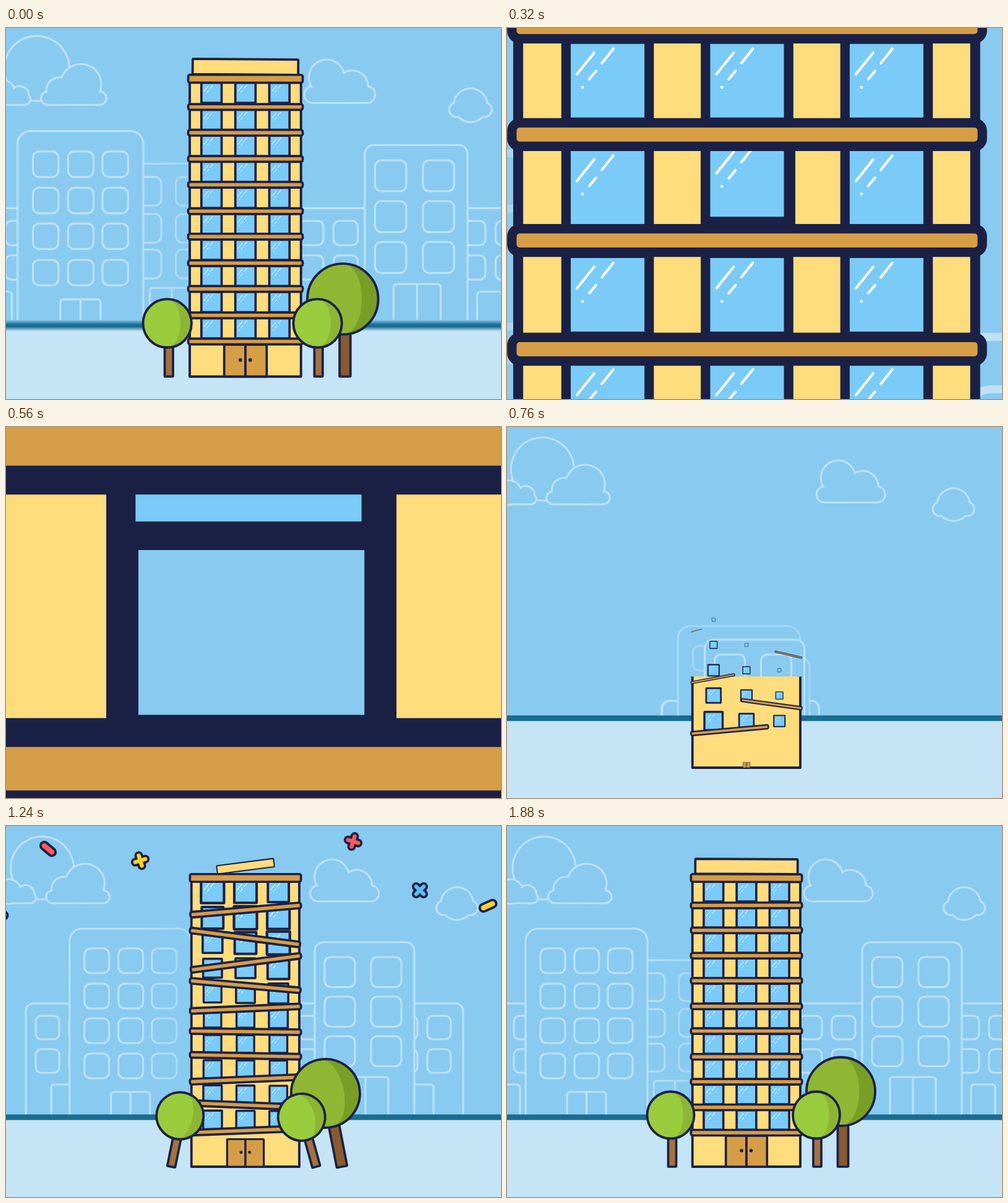
Write an HTML page with a canvas that moves like this. It is 800 by 600 pixels and loops after 1.92 s.

```html
<!DOCTYPE html>
<html lang="en">
<head>
<meta charset="utf-8">
<title>Tower loop</title>
<style>
html, body { margin: 0; width: 100%; height: 100%; overflow: hidden; background: #89caf0; }
canvas { display: block; width: 800px; height: 600px; }
</style>
</head>
<body>
<canvas id="stage" width="800" height="600"></canvas>
<script>
const ctx = document.getElementById('stage').getContext('2d');
const LOOP = 1920, STEP = 40, THROUGH = 720;
const SKY = '#89caf0', GROUND = '#c5e4f6', HORIZON = '#186d91', LINE = '#bde2f8';
const NAVY = '#1b2145', WALL = '#ffdc7c', WOOD = '#d69d47', GLASS = '#7acbf7';
const RED = '#fb5a5f', YELLOW = '#fdd22f', BLUE = '#5cbcf0';

// Tower geometry
const MID = 387, LEFT = 299.7, RIGHT = 474, FLOOR = 551;
const BARS = [84, 128.3, 168.7, 209.8, 250.2, 291.7, 331.6, 373.2, 413.6, 455, 496];
const COLS = [333.8, 387, 440.2];
const OPEN_ROW = 3, ROW_Y = 230;

// Smooth monotone curve through time, value pairs
function key(t, a) {
  const n = a.length / 2;
  if (t <= a[0]) return a[1];
  if (t >= a[2 * n - 2]) return a[2 * n - 1];
  const sec = i => (a[2 * i + 3] - a[2 * i + 1]) / (a[2 * i + 2] - a[2 * i]);
  const slope = i => {
    if (i === 0) return sec(0);
    if (i === n - 1) return sec(n - 2);
    const p = sec(i - 1), q = sec(i);
    return p * q > 0 ? 2 * p * q / (p + q) : 0;
  };
  let i = 0;
  while (t > a[2 * i + 2]) i++;
  const h = a[2 * i + 2] - a[2 * i], u = (t - a[2 * i]) / h, w = 1 - u;
  return a[2 * i + 1] * w * w * (1 + 2 * u) + a[2 * i + 3] * u * u * (3 - 2 * u)
    + h * u * w * (slope(i) * w - slope(i + 1) * u);
}

const swing = u => key(u, [-7, -18, -5, -13, -4, -10.5, -3, -7.8, -2, -5.2, -1, -2.3, 0, 0, 1, 4.9,
  2, 7.4, 3, 7.4, 4, 5, 5, 2.4, 6, 0.6, 7, -1, 8, -2.4, 9, -2.3, 10, -2.2, 11, -1, 12, -0.5, 14, 0.2, 18, 0]);
const pop = v => key(v, [-3, 0, -2, 0.17, -1, 0.37, 0, 0.57, 1, 0.75, 2, 0.93, 3, 1.07, 4, 1.14,
  5, 1.17, 6, 1.1, 7, 1.01, 8, 0.96, 9, 0.91, 10, 0.89, 11, 0.9, 13, 0.94, 16, 1]);

function at(x, y, deg, s, draw) {
  if (s <= 0.01) return;
  ctx.save();
  ctx.translate(x, y);
  ctx.rotate(deg * Math.PI / 180);
  ctx.scale(s, s);
  draw();
  ctx.restore();
}

function box(x, y, w, h, r, fill, stroke, lw) {
  ctx.beginPath();
  ctx.roundRect(x, y, w, h, r);
  if (fill) { ctx.fillStyle = fill; ctx.fill(); }
  if (stroke) { ctx.strokeStyle = stroke; ctx.lineWidth = lw; ctx.stroke(); }
}

function rect(x, y, w, h, fill) {
  ctx.fillStyle = fill;
  ctx.fillRect(x, y, w, h);
}

function seg(x1, y1, x2, y2, color, lw) {
  ctx.strokeStyle = color;
  ctx.lineWidth = lw;
  ctx.beginPath();
  ctx.moveTo(x1, y1);
  ctx.lineTo(x2, y2);
  ctx.stroke();
}

// Outline around the union of a flat base and some circles
function cloud(dx, base, bumps) {
  for (const [grow, color] of [[1.5, LINE], [-1.5, SKY]]) {
    ctx.fillStyle = color;
    if (base) {
      const [l, r, top, bottom] = base;
      const h = bottom - top + 2 * grow;
      box(l + dx - grow, top - grow, r - l + 2 * grow, h, h / 2, color);
    }
    for (const [x, y, r] of bumps) {
      ctx.beginPath();
      ctx.arc(x + dx, y, r + grow, 0, 7);
      ctx.fill();
    }
  }
}

function clouds(t) {
  const d = Math.min(t, LOOP) - 1880;
  const slow = d * 0.0024;
  cloud(slow, null, [[60, 68, 51]]);
  cloud(slow, [-40, 50, 108, 125], [[6, 106, 20], [33, 110, 14.5]]);
  cloud(slow, [66.5, 169, 104, 125], [[95, 102, 20], [129, 93, 32]]);
  cloud(d * -0.018, [480, 591, 96, 122], [[515, 82, 28], [555, 96, 25]]);
  cloud(d * 0.0155, [705.5, 772.5, 121, 144], [[739, 125.5, 26.5]]);
}

function house(x, top, w, r, color, wins, door) {
  box(x, top, w, 500 - top, [r, r, 0, 0], SKY, color, 3);
  const { xs, ys, cw, ch, cr } = wins;
  for (const wx of xs) for (const wy of ys) box(x + wx, wy, cw, ch, cr, null, color, 3);
  if (!door) return;
  const [dx, dy, dw, split] = door;
  box(x + dx, dy, dw, 500 - dy, [5, 5, 0, 0], null, color, 3);
  if (split) seg(x + dx + dw / 2, dy, x + dx + dw / 2, 500, color, 3);
}

function houses(t) {
  if (t < 640) return;
  const q = key(t, [760, 1.6, 1040, 1, 1240, 0.472, 1560, 0.1, 1880, 0]);
  const rise = key(t, [640, 340, 820, 90, 1000, 0]);
  const fade = ctx.createLinearGradient(215, 0, 300, 0);
  fade.addColorStop(0, LINE);
  fade.addColorStop(1, '#a5d6f4');
  const low = xs => ({ xs, ys: [307, 361], cw: 38, ch: 38, cr: 9 });
  ctx.save();
  ctx.translate(0, rise);
  house(-59 + 193 * q, 287, 130, 12, LINE, low([16, 70]), [41, 418, 39]);
  house(837 - 208 * q - 135, 287, 135, 12, LINE, low([23, 77]), [48, 418, 39]);
  house(185 + 90 * q, 217, 160, 14, fade,
    { xs: [29, 93], ys: [238, 296, 352], cw: 41, ch: 45, cr: 10 }, [52, 412, 69, true]);
  house(430 - 112 * q, 287, 165, 12, LINE, low([41, 95]));
  house(30 + 154 * q, 166, 197, 20, fade,
    { xs: [24, 79, 133], ys: [198, 255, 311, 368], cw: 40, ch: 40, cr: 10 }, [67, 430, 63, true]);
  house(574 - 159 * q, 188, 161, 14, LINE,
    { xs: [16, 91], ys: [212, 276, 340], cw: 49, ch: 48.5, cr: 10 }, [45, 406, 74, true]);
  ctx.restore();
}

function ground(t) {
  rect(-400, 471, 1600, 900, GROUND);
  if (t < LOOP) return rect(-400, 466.5, 1600, 9, HORIZON);
  const soft = ctx.createLinearGradient(0, 462, 0, 480);
  soft.addColorStop(0, SKY);
  soft.addColorStop(0.42, HORIZON);
  soft.addColorStop(0.6, HORIZON);
  soft.addColorStop(1, GROUND);
  rect(-400, 462, 1600, 18, soft);
}

// color, crossed, place and turn at 1040 ms, then at 1240 ms
const BITS = [
  [RED, 0, 173, 125, 108, 68, 37, 40],
  [BLUE, 0, 131, 183, 138, -11, 142, 200],
  [YELLOW, 0, 608, 201, 71, 779, 129, -24],
  [YELLOW, 1, 288, 153, 17, 217, 56, -17],
  [RED, 1, 494, 119, 45, 561, 25, 17],
  [BLUE, 1, 523, 256, 30, 669, 104, 45]
];

function confetti(t) {
  if (t < 860 || t > 1800) return;
  const n = (t - 1040) / 200;
  const gx = (1 - 0.76 ** n) / 0.24, gy = (1 - 0.48 ** n) / 0.52;
  const size = key(t, [860, 0, 960, 1]);
  ctx.lineCap = 'round';
  for (const [color, cross, x1, y1, r1, x2, y2, r2] of BITS) {
    at(x1 + (x2 - x1) * gx, y1 + (y2 - y1) * gy, r1 + (r2 - r1) * gx, size, () => {
      const half = cross ? 8.5 : 8;
      for (const [c, lw] of [[NAVY, cross ? 14 : 16], [color, cross ? 6.5 : 8]]) {
        seg(-half, 0, half, 0, c, lw);
        if (cross) seg(0, -half, 0, half, c, lw);
      }
    });
  }
}

function pane() {
  box(-15.85, -15.85, 31.7, 31.7, 0.6, GLASS, NAVY, 3.6);
  ctx.lineCap = 'round';
  seg(-11.7, -2.5, -5.1, -10.7, '#fff', 0.95);
  seg(-2.2, -6.7, 2.2, -12.2, '#fff', 0.95);
  seg(-7, -0.6, -4.4, -3.7, '#fff', 0.95);
  seg(-9.6, 2.5, -9.55, 2.5, '#fff', 1.1);
}

const lift = t => key(t, [2120, 0, 2240, 2.9, 2360, 10, 2480, 24.6, 2560, 34]);

function openWindow(t) {
  ctx.save();
  ctx.beginPath();
  ctx.rect(369.3, 209.8, 36.1, 40.4);
  ctx.clip();
  rect(369.3, 209.8, 36.1, 40.4, NAVY);
  at(MID, ROW_Y - lift(t), 0, 1, pane);
  ctx.restore();
}

function doors() {
  for (const x of [-33.3, 0]) box(x, -50, 33.3, 50, 1, WOOD, NAVY, 3.6);
  ctx.fillStyle = NAVY;
  for (const x of [-8, 7.5]) {
    ctx.beginPath();
    ctx.arc(x, -26, 2.8, 0, 7);
    ctx.fill();
  }
}

function tower(t) {
  if (t < 600) return;
  const n = (t - 1040) / STEP;
  const top = key(t, [600, 551, 1040, 150, 1120, 84]);
  at(MID, 64.5, key(t, [1160, -14, 1240, -7.3, 1320, 0, 1420, 6, 1560, 2.8, 1700, -0.8, 1880, 0.3, 1960, 0.5]),
    key(t, [1160, 0, 1240, 0.56, 1330, 1]),
    () => box(-82.7, -11, 165.4, 24, 1.5, WALL, NAVY, 3.7));

  rect(LEFT, top, RIGHT - LEFT, FLOOR - top, WALL);
  ctx.lineCap = 'butt';
  ctx.lineJoin = 'round';
  ctx.strokeStyle = NAVY;
  ctx.lineWidth = 3.8;
  ctx.beginPath();
  ctx.moveTo(LEFT, top);
  ctx.lineTo(LEFT, FLOOR);
  ctx.lineTo(RIGHT, FLOOR);
  ctx.lineTo(RIGHT, top);
  ctx.stroke();

  for (let r = 0; r < 10; r++) {
    const y = (BARS[r] + BARS[r + 1]) / 2;
    COLS.forEach((x, c) => {
      if (r === OPEN_ROW && c === 1 && lift(t) > 0) openWindow(t);
      else at(x, y, 0, pop(n + r - c), pane);
    });
  }
  at(MID, FLOOR, 0, pop(n + 5), doors);

  // Bars hinge on alternating ends, rippling up the tower
  BARS.forEach((y, i) => {
    const u = n + i - 5, side = i % 2 ? -1 : 1, h = i ? 9 : 12.5;
    const len = Math.min(1, Math.max(0, 1 + 0.15 * u));
    at(side > 0 ? 297.3 : 476.7, y, side * swing(u), len, () =>
      box(side > 0 ? 0 : -179.4, -h / 2, 179.4, h, 3, WOOD, NAVY, 3.6));
  });
}

function tree(x, deg, s, r, h, trunk, off, wood, light, shade) {
  at(x, 551, deg, s, () => {
    box(-trunk / 2, -h, trunk, h, 0.8, wood, NAVY, 3.7);
    ctx.translate(off, -h);
    ctx.beginPath();
    ctx.arc(0, 0, r, 0, 7);
    ctx.fillStyle = shade;
    ctx.fill();
    ctx.beginPath();
    ctx.arc(0, 0, r, Math.PI / 2, -Math.PI / 2);
    ctx.ellipse(0, 0, r * 0.54, r, 0, -Math.PI / 2, Math.PI / 2);
    ctx.fillStyle = light;
    ctx.fill();
    ctx.beginPath();
    ctx.arc(0, 0, r, 0, 7);
    ctx.strokeStyle = NAVY;
    ctx.lineWidth = 3.8;
    ctx.stroke();
  });
}

function trees(t) {
  const small = ['#a3723f', '#99cc3c', '#8db534'];
  tree(543, key(t, [920, 85, 1040, 51, 1140, 5, 1240, -11, 1420, 7, 1560, 4, 1740, -2, 1880, 0]),
    key(t, [920, 0, 1040, 0.42, 1140, 0.9, 1200, 1]), 55.5, 121.5, 17, -3.5, '#8a5a30', '#8fb733', '#799e27');
  tree(267, key(t, [860, -40, 1040, -11.5, 1140, 4, 1240, 11.5, 1420, -4, 1560, -0.3, 1700, 0]),
    key(t, [860, 0, 1040, 0.86, 1120, 1]), 38, 83.5, 13, -2.5, ...small);
  tree(501.5, key(t, [900, 55, 1040, 23, 1140, -5, 1240, -15.5, 1420, 4, 1560, 2, 1740, -0.5, 1880, 0]),
    key(t, [900, 0, 1040, 0.73, 1140, 1]), 38, 83.5, 13, -1.5, ...small);
}

function scene(t) {
  rect(-400, -400, 1600, 1400, SKY);
  clouds(t);
  houses(t);
  ground(t);
  confetti(t);
  tower(t);
  trees(t);
}

function render(t) {
  ctx.setTransform(1, 0, 0, 1, 0, 0);
  if (t >= THROUGH) return scene(t);

  // Fly into the opening window; the next city waits behind it
  const T = t + LOOP;
  const s = Math.exp(key(T, [1880, 0, 1920, 0.031, 2240, 1.444, 2480, 2.565, 2640, 3.45]));
  const cx = key(T, [1880, 387, 1920, 387, 2240, 388, 2480, 392, 2640, 400]);
  const cy = key(T, [1880, 230, 1920, 232.6, 2240, 258, 2480, 290, 2640, 300]);
  ctx.save();
  ctx.translate(cx, cy);
  ctx.scale(s, s);
  ctx.translate(-MID, -ROW_Y);
  scene(T);
  ctx.restore();

  const top = Math.max(216.5, 247.6 - lift(T)), bottom = 243.5;
  if (top >= bottom) return;
  ctx.save();
  ctx.beginPath();
  ctx.rect(cx + (373.3 - MID) * s, cy + (top - ROW_Y) * s, 28.1 * s, (bottom - top) * s);
  ctx.clip();
  scene(t);
  ctx.restore();
}

const start = performance.now();
function tick() {
  const t = (performance.now() - start) % LOOP;
  render(Math.floor(t / STEP) * STEP);
  requestAnimationFrame(tick);
}
tick();
</script>
</body>
</html>
```
